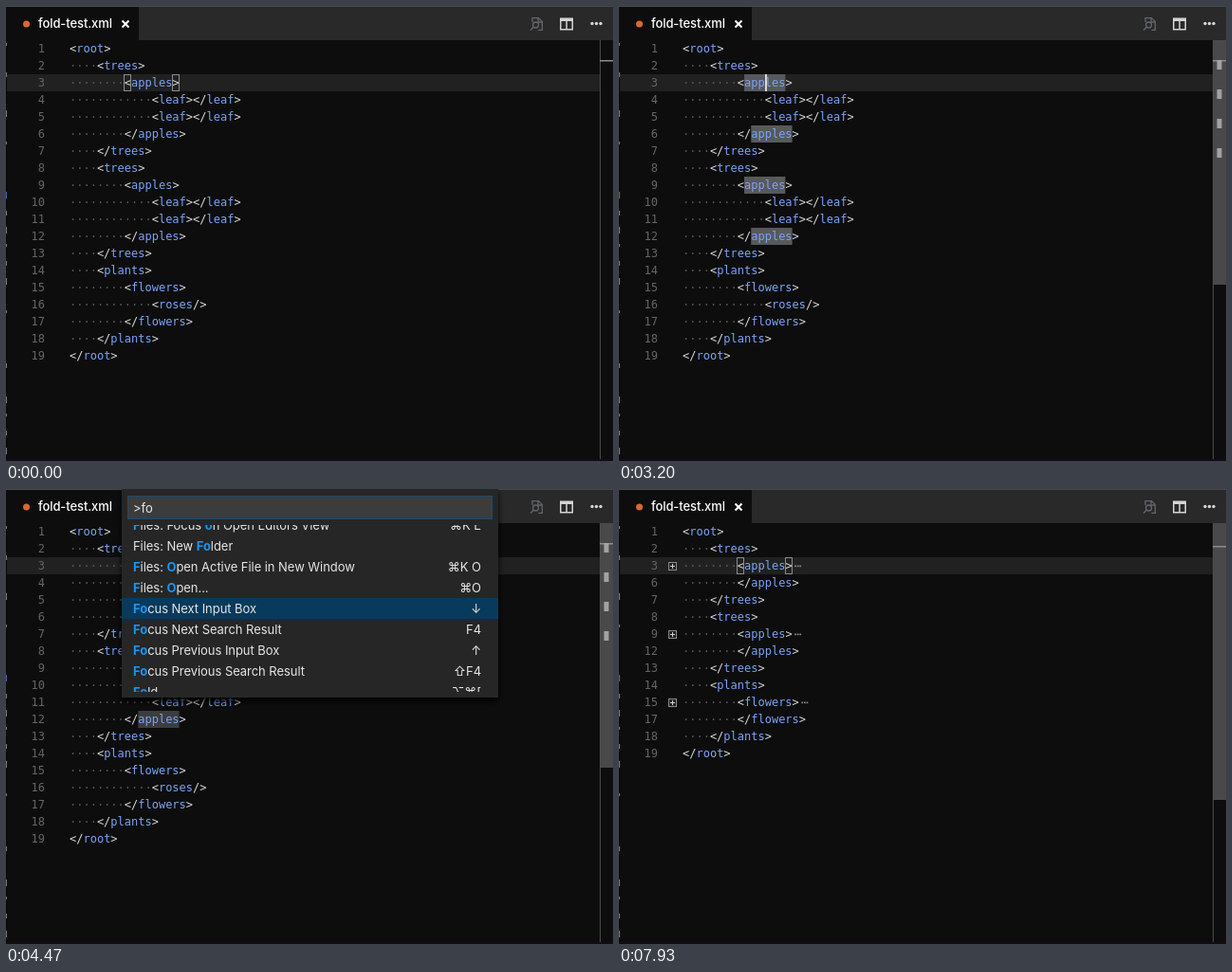
An HTML page that plays this animation: 640x480 px, repeating every 8 s.

```html
<!DOCTYPE html>
<html lang="en">
<head>
<meta charset="utf-8">
<title>Folding</title>
<style>
  html, body { margin: 0; width: 100%; height: 100%; overflow: hidden; background: #0d0d0d; }
  svg { display: block; width: 100vw; height: 100vh; }
  text { white-space: pre; }
  .code { font: 12px "DejaVu Sans Mono", monospace; }
  .ui { font: 13px Inter, "DejaVu Sans", sans-serif; letter-spacing: -.05px; fill: #e6e6e6; }
  .hit { fill: #1796f3; font-weight: 700; }
  .punct { fill: #d6d8da; }
  .tag { fill: #7ba4f5; }
  .num { fill: #646464; text-anchor: end; }
  .dots { fill: #565656; }
</style>
</head>
<body>
<svg id="stage" viewBox="0 0 640 480" preserveAspectRatio="none">
  <defs>
    <clipPath id="listClip"><rect x="122" y="38" width="397" height="176"/></clipPath>
    <filter id="shadow" x="-10%" y="-10%" width="120%" height="140%">
      <feDropShadow dx="0" dy="4" stdDeviation="3" flood-color="#000" flood-opacity=".9"/>
    </filter>
  </defs>
</svg>
<script>
const LOOP = 8000, COL = 7.224, LEFT = 67, TOP = 36, ROW = 18;
const CLICK = 2100, MARK = 2300, OPEN = 3400, ENTER = 7300;
const stage = document.getElementById("stage");

function el(parent, name, attrs = {}, text) {
  const node = document.createElementNS("http://www.w3.org/2000/svg", name);
  for (const key in attrs) node.setAttribute(key, attrs[key]);
  if (text !== undefined) node.textContent = text;
  return parent.appendChild(node);
}
const group = (parent, attrs) => el(parent, "g", attrs);
const rect = (parent, x, y, width, height, fill, more) =>
  el(parent, "rect", { x, y, width, height, fill, ...more });
const show = (node, on) => node.setAttribute("visibility", on ? "visible" : "hidden");
const colX = col => LEFT + col * COL;

// Document lines with their nesting depth
let depth = 0;
const leaves = "<leaf></leaf> <leaf></leaf>";
const tree = `<trees> <apples> ${leaves} </apples> </trees>`;
const lines = `<root> ${tree} ${tree} <plants> <flowers> <roses/> </flowers> </plants> </root>`
  .split(" ").map((text, i) => {
    if (text.startsWith("</")) depth--;
    const line = { text, depth, num: i + 1 };
    if (!text.includes("/")) depth++;
    return line;
  });

// Window frame
rect(stage, 0, 0, 640, 480, "#0d0d0d");
rect(stage, 0, 0, 640, 36, "#292929");
rect(stage, 0, 0, 140, 36, "#0d0d0d");
rect(stage, 0, 0, 640, 1, "#484848");
rect(stage, 0, 72, 626, 18, "#212122");
rect(stage, 0, 36, 1, 442, "#050505");
[41, 72, 112, 145, 218, 235, 253, 271, 289, 323, 379, 414, 432, 450, 468]
  .forEach((y, i) => rect(stage, 0, y - 2, 1, 3 + i % 3 * 2, "#777"));
rect(stage, 0, 196, 1, 7, "#4d62a8");

el(stage, "circle", { cx: 21.5, cy: 19, r: 3.5, fill: "#d9682f" });
el(stage, "text", { x: 34, y: 23, class: "ui", style: "font-weight:500;fill:#fff;letter-spacing:-.1px" }, "fold-test.xml");
el(stage, "path", { d: "M122.5 15.5l7 7m0-7l-7 7", stroke: "#fff", "stroke-width": 2 });

// Title actions
const actions = group(stage, { fill: "none", stroke: "#62666c", "stroke-width": 1.3 });
el(actions, "path", { d: "M555 17v-4.400h6.500l3.800 3.800v9h-4M561 13v4h4M553 25.500l3.200-3.200" });
el(actions, "circle", { cx: 558.500, cy: 20, r: 3 });
el(stage, "path", { d: "M584 12.500h14v13h-14zM585.500 16v8h4.800v-8zM591.800 16v8h4.700v-8z", fill: "#d4d4d4", "fill-rule": "evenodd" });
[618, 622.5, 627].forEach(cx => el(stage, "circle", { cx, cy: 18.5, r: 1.7, fill: "#d4d4d4" }));

// Overview ruler
rect(stage, 626, 36, 1, 442, "#4c4c4c");
const slider = rect(stage, 627, 36, 13, 258, "#494949");
const rulerLine = rect(stage, 626, 57, 14, 1.5, "#8c8c8c");
const rulerMarks = group(stage);
[57, 88, 119, 150].forEach(y => rect(rulerMarks, 630.5, y, 5, 10, "#a2a2a2"));
rect(stage, 0, 478, 640, 2, "#150b16");

// Word highlights
const words = group(stage);
lines.filter(l => l.text.includes("apples")).forEach(l =>
  rect(words, colX(l.depth * 4 + l.text.indexOf("a")), TOP + (l.num - 1) * ROW, 6 * COL, ROW));

function drawCode(list, folded) {
  const view = group(stage, { class: "code" });
  list.forEach((l, i) => {
    const top = TOP + i * ROW, y = top + 13, x = colX(l.depth * 4);
    el(view, "text", { x: 41, y, class: "num" }, l.num);
    el(view, "text", { x: LEFT, y, class: "dots" }, "·".repeat(l.depth * 4));
    const text = el(view, "text", { x, y });
    l.text.split(/([<>\/]+)/).filter(Boolean).forEach(part =>
      el(text, "tspan", { class: /[<>]/.test(part) ? "punct" : "tag" }, part));
    if (folded && l.depth === 2 && !l.text.includes("/")) {
      rect(view, 52.5, top + 5.5, 8, 8, "#222", { stroke: "#8a8a8a" });
      el(view, "path", { d: `M54 ${top + 9.5}h5m-2.500-2.500v5`, stroke: "#d0d0d0" });
      const end = x + l.text.length * COL;
      for (let k = 0; k < 3; k++) rect(view, end + 2.6 + k * 2.6, top + 8.5, 1.7, 1.7, "#8a8a8a");
    }
  });
  return view;
}
const fullView = drawCode(lines, false);
const foldedView = drawCode(lines.filter(l => l.depth < 3), true);

const brackets = group(stage);
[8, 15].forEach(c => rect(brackets, Math.floor(colX(c)) + .5, 72.5, 7, 17, "none", { stroke: "#8b8b8b" }));
const caret = rect(stage, 0, 72, 2, 18, "#d8d8d8");

// Command palette: asterisks mark matched letters, "|" precedes the shortcut
const palettes = [
  { at: OPEN, query: ">", pick: 0, scroll: 0, rows: [
    "Add Cursor Above|⌥⌘↑", "Add Cursor Below|⌥⌘↓", "Add Cursors to Line Ends|⇧⌥I",
    "Add Line Comment|⌘K ⌘C", "Add Selection To Next Find Match|⌘D",
    "Add Selection To Previous Find Match", "Change All Occurrences|⌘F2", "Change End of Line Sequence"] },
  { at: 3720, query: ">f", pick: 0, scroll: 0, rows: [
    "*F*ile: New Untitled File|⌘N", "*F*iles: Compare Active File With...", "*F*iles: Copy Path of Active File|⌘K P",
    "*F*iles: Focus on Open Editors View|⌘K E", "*F*iles: New File", "*F*iles: New Folder",
    "*F*iles: Open Active File in New Window|⌘K O", "*F*iles: Open...|⌘O"] },
  { at: 3950, query: ">fo", pick: 4, scroll: 11, rows: [
    "*F*iles: Focus *o*n Open Editors View|⌘K E", "Files: New *Fo*lder",
    "*F*iles: *O*pen Active File in New Window|⌘K O", "*F*iles: *O*pen...|⌘O",
    "*Fo*cus Next Input Box|↓", "*Fo*cus Next Search Result|F4", "*Fo*cus Previous Input Box|↑",
    "*Fo*cus Previous Search Result|⇧F4", "*Fo*ld|⌥⌘["] },
  { at: 4480, query: ">fol", pick: 1, scroll: 0, rows: [
    "Files: New *Fol*der", "*Fol*d|⌥⌘[", "*Fol*d All|⌘K ⌘0", "*Fol*d All Block Comments|⌘K ⌘/",
    "*Fol*d All Same Level as Cursor", "*Fol*d Level 1|⌘K ⌘1", "*Fol*d Level 2|⌘K ⌘2", "*Fol*d Level 3|⌘K ⌘3"] },
  { at: 4750, query: ">folc", pick: 0, scroll: 0, rows: ["*Fol*d All Same Level as *C*ursor"] },
];

for (const p of palettes) {
  const box = p.box = group(stage, { class: "ui" });
  const height = 38 + Math.min(8, p.rows.length) * 22 + 6;
  rect(box, 122, 0, 397, height, "#252526", { filter: "url(#shadow)" });
  rect(box, 128.5, 7.5, 384, 24, "#3c3c3c", { stroke: "#1b4d73" });
  p.input = el(box, "text", { x: 134, y: 25 }, p.query);
  const list = group(box, { "clip-path": "url(#listClip)" });
  p.rows.forEach((row, i) => {
    const top = 38 - p.scroll + i * 22, y = top + 15.5;
    const [label, key] = row.split("|");
    if (i === p.pick) rect(list, 122, top, 397, 22, "#073a5c");
    const text = el(list, "text", { x: 134, y });
    label.split("*").forEach((part, k) => part && el(text, "tspan", k % 2 ? { class: "hit" } : {}, part));
    if (key) el(list, "text", { x: 501, y, "text-anchor": "end" }, key);
  });
  p.caret = rect(box, 0, 12, 1, 16, "#e8e8e8");
}

const blink = age => age % 1000 < 500;

function render(t) {
  const clicked = t >= CLICK, folded = t >= ENTER;
  const open = t >= OPEN && !folded;
  const inWord = clicked && !folded;
  const marked = t >= MARK && !folded;

  show(fullView, !folded);
  show(foldedView, folded);
  show(brackets, !inWord);
  show(words, marked);
  words.setAttribute("fill", open ? "#3b3d40" : "#57595c");
  show(rulerMarks, marked);
  rulerLine.setAttribute("y", folded ? 60 : 57);
  slider.setAttribute("height", folded ? 292 : 258);
  slider.setAttribute("opacity", Math.min(1, Math.max(0, (t - CLICK) / 100)));

  const since = folded ? t - ENTER : clicked ? t - CLICK : t + 500;
  show(caret, !open && blink(since));
  caret.setAttribute("x", inWord ? colX(12) + .3 : colX(16) + .4);

  palettes.forEach((p, i) => {
    const next = palettes[i + 1];
    const on = open && t >= p.at && (!next || t < next.at);
    p.box.setAttribute("display", on ? "inline" : "none");
    if (!on) return;
    p.caret.setAttribute("x", 134 + p.input.getComputedTextLength());
    show(p.caret, blink(t - p.at));
  });
}

const start = performance.now();
function tick() {
  render((performance.now() - start) % LOOP);
  requestAnimationFrame(tick);
}
tick();
</script>
</body>
</html>
```
